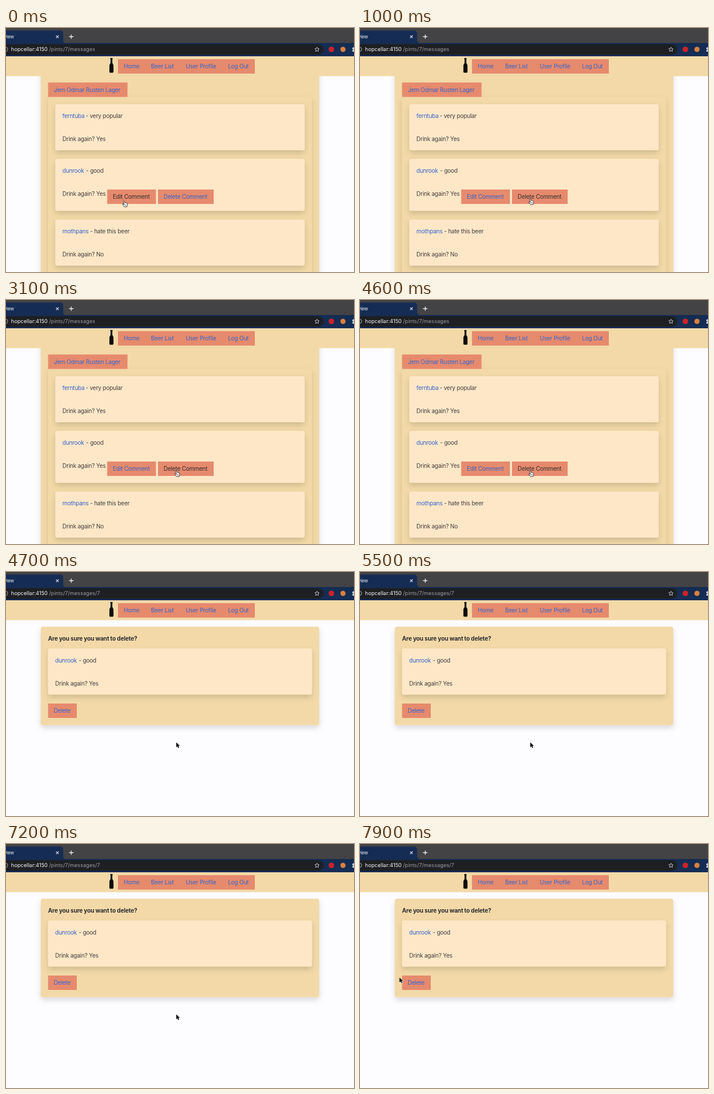
Recreate the animation shown at these times as an HTML page. Size 600 by 423 pixels, loop 8000 ms.

```html
<!DOCTYPE html>
<html lang="en">
<head>
<meta charset="utf-8">
<title>Comments</title>
<style>
  html, body { margin: 0; width: 100%; height: 100%; overflow: hidden; background: #fdfdff; }
  svg { display: block; width: 600px; height: 423px; }
  text { font: 10px Inter, "Open Sans", sans-serif; letter-spacing: -.25px; fill: #42403f; }
  .link { fill: #3565cc; }
  .bold { font-weight: 700; letter-spacing: -.18px; fill: #2d2d33; }
  .url { font-size: 9.1px; letter-spacing: 0; fill: #9a9ca1; }
  .host { fill: #f4f5f7; }
  .sand { fill: #f2d9a7; }
  .card { fill: #fee7c7; filter: url(#soft); }
  .panel { filter: url(#soft); }
  .btn { fill: #e68a6d; }

  .list, .confirm, .edit, .delete, .hand, .arrow { animation: 8s linear infinite; }
  .list { animation-name: leave; animation-timing-function: step-end; }
  .confirm { animation-name: enter; animation-timing-function: step-end; }
  .edit { animation-name: unhover; animation-timing-function: step-end; }
  .delete { animation-name: hover; animation-timing-function: step-end; }
  .hand { animation-name: slide; }
  .arrow { animation-name: roam; }

  @keyframes leave { 0% { visibility: visible } 58.75%, 100% { visibility: hidden } }
  @keyframes enter { 0% { visibility: hidden } 58.75%, 100% { visibility: visible } }
  @keyframes unhover { 0% { fill: #33302f } 7.1%, 100% { fill: #3565cc } }
  @keyframes hover { 0% { fill: #3565cc } 7.4%, 100% { fill: #33302f } }
  @keyframes slide {
    0% { transform: none; animation-timing-function: ease-in-out }
    12.5%, 100% { transform: translate(90px, -4px) }
  }
  @keyframes roam {
    0%, 92.5% { transform: translate(0, 0) }
    93.75% { transform: translate(-24px, -12px) }
    95% { transform: translate(-85px, -40px) }
    96.25% { transform: translate(-160px, -66px) }
    97.5% { transform: translate(-205px, -72.5px) }
    98.75%, 100% { transform: translate(-225.5px, -64px) }
  }
</style>
</head>
<body>
<svg viewBox="0 0 600 423">
  <defs>
    <filter id="soft" x="-10%" y="-25%" width="120%" height="160%">
      <feDropShadow dx="0" dy="5" stdDeviation="5" flood-color="#000" flood-opacity=".14"/>
    </filter>
  </defs>
  <rect width="600" height="423" fill="#fdfdff"/>

  <!-- comment list -->
  <g class="list">
    <rect class="sand panel" x="60" y="60" width="480" height="420"/>
    <rect class="sand panel" x="72.5" y="119.5" width="455" height="360" rx="3"/>
    <rect class="btn" x="72.5" y="94.5" width="137" height="25"/>
    <text class="link" x="82.5" y="111">Jem Odmar Rusten Lager</text>

    <rect class="card" x="85" y="132" width="430" height="80" rx="3.5"/>
    <text class="link" x="97.3" y="156">ferntuba</text>
    <text x="137.5" y="156">- very popular</text>
    <text x="97.3" y="196">Drink again? Yes</text>

    <rect class="card" x="85" y="227" width="430" height="90" rx="3.5"/>
    <text class="link" x="97.3" y="251">dunrook</text>
    <text x="138" y="251">- good</text>
    <text x="97.3" y="291">Drink again? Yes</text>
    <rect class="btn" x="174.5" y="280" width="84" height="25"/>
    <text class="edit" x="184.3" y="296">Edit Comment</text>
    <rect class="btn" x="262" y="280" width="96" height="25"/>
    <text class="delete" x="271.8" y="296">Delete Comment</text>

    <rect class="card" x="85" y="332" width="430" height="80" rx="3.5"/>
    <text class="link" x="97.3" y="356">mothpans</text>
    <text x="145" y="356">- hate this beer</text>
    <text x="97.3" y="396">Drink again? No</text>
  </g>

  <!-- delete confirmation -->
  <g class="confirm">
    <rect class="sand panel" x="60" y="95" width="480" height="170.5" rx="3.5"/>
    <text class="bold" x="72.5" y="119">Are you sure you want to delete?</text>
    <rect class="card" x="72.5" y="132.5" width="455" height="80" rx="3.5"/>
    <text class="link" x="84.8" y="157">dunrook</text>
    <text x="125.5" y="157">- good</text>
    <text x="84.8" y="197">Drink again? Yes</text>
    <rect class="btn" x="72.5" y="228" width="49.5" height="25"/>
    <text class="link" x="82.3" y="244">Delete</text>
  </g>

  <!-- site navigation -->
  <rect class="sand" y="49" width="600" height="34.5"/>
  <path d="M180 52h3.6v2l-.3 1v5.2c.2 1.8 2 2.6 2 5V76q0 1.500-1.500 1.500h-4q-1.500 0-1.500-1.500V65.200c0-2.400 1.800-3.200 2-5V55l-.3-1z" fill="#0b0908"/>
  <rect class="btn" x="193" y="54" width="236" height="25"/>
  <text class="link" x="203" y="70">Home</text>
  <text class="link" x="250" y="70">Beer List</text>
  <text class="link" x="310" y="70">User Profile</text>
  <text class="link" x="382.700" y="70">Log Out</text>

  <!-- browser frame -->
  <rect width="600" height="27" fill="#434245"/>
  <path d="M0 4.500H93q5.500 0 5.500 5.500V21q0 5 5 5H600V49H0z" fill="#152d54"/>
  <text x="13.500" y="18" text-anchor="end" style="font-size:8px;fill:#eef0f4">view</text>
  <g fill="none" stroke="#e6e8ec" stroke-width="1.100">
    <path d="M86.300 12.800l4.600 4.600m0-4.600l-4.600 4.600"/>
    <path d="M112.500 11.200v7.600m-3.800-3.800h7.600" stroke-width="1.300"/>
  </g>
  <rect x="-12" y="28" width="559" height="18.500" rx="9.200" fill="#1d1f23"/>
  <circle cx="-.5" cy="37" r="3.600" fill="none" stroke="#a4a7ac"/>
  <text class="url host" x="8.800" y="40.300">hopcellar:4150</text>
  <text class="url" x="74.300" y="40.300">/pints/7/messages<tspan class="confirm">/7</tspan></text>
  <path d="M536.200 33.200l1.100 2.600 2.800.2-2.100 1.900.6 2.700-2.400-1.400-2.400 1.400.6-2.700-2.100-1.900 2.800-.2z" fill="none" stroke="#c9cbd0" stroke-width=".9"/>
  <circle cx="561" cy="37" r="4.800" fill="#c9252b"/>
  <circle cx="581" cy="37" r="4.500" fill="#dc7f3c"/>
  <path d="M597 34h2q.4-1.600 1.600-1.600V41H597v-2.400q1.500-.1 1.500-1.100t-1.500-1.100z" fill="#c6cad2"/>

  <!-- pointers -->
  <g class="list"><g class="hand">
    <g transform="translate(200.500 299)" stroke="#171717" stroke-width=".8" stroke-linejoin="round" stroke-linecap="round">
      <path d="M2 1.200q.8-1.200 1.700-.1L4.400 3.800q2.600 0 4.100 1.200.8 2-.2 4.100L8 11H3.600L.6 7.300q-.6-1.300.7-1.200l1.700.9z" fill="#fff"/>
      <path d="M4.700 7.200v1.800M6.200 7.200v1.800" stroke-width=".5"/>
    </g>
  </g></g>
  <g class="confirm"><g class="arrow">
    <path transform="translate(293.500 295.300)" d="M0 0V8.800L2.100 6.900 3.500 10 5 9.300 3.700 6.300H6.300z" fill="#0a0a0a" stroke="#fff" stroke-width="1.200" stroke-linejoin="round" paint-order="stroke"/>
  </g></g>
</svg>
</body>
</html>
```
